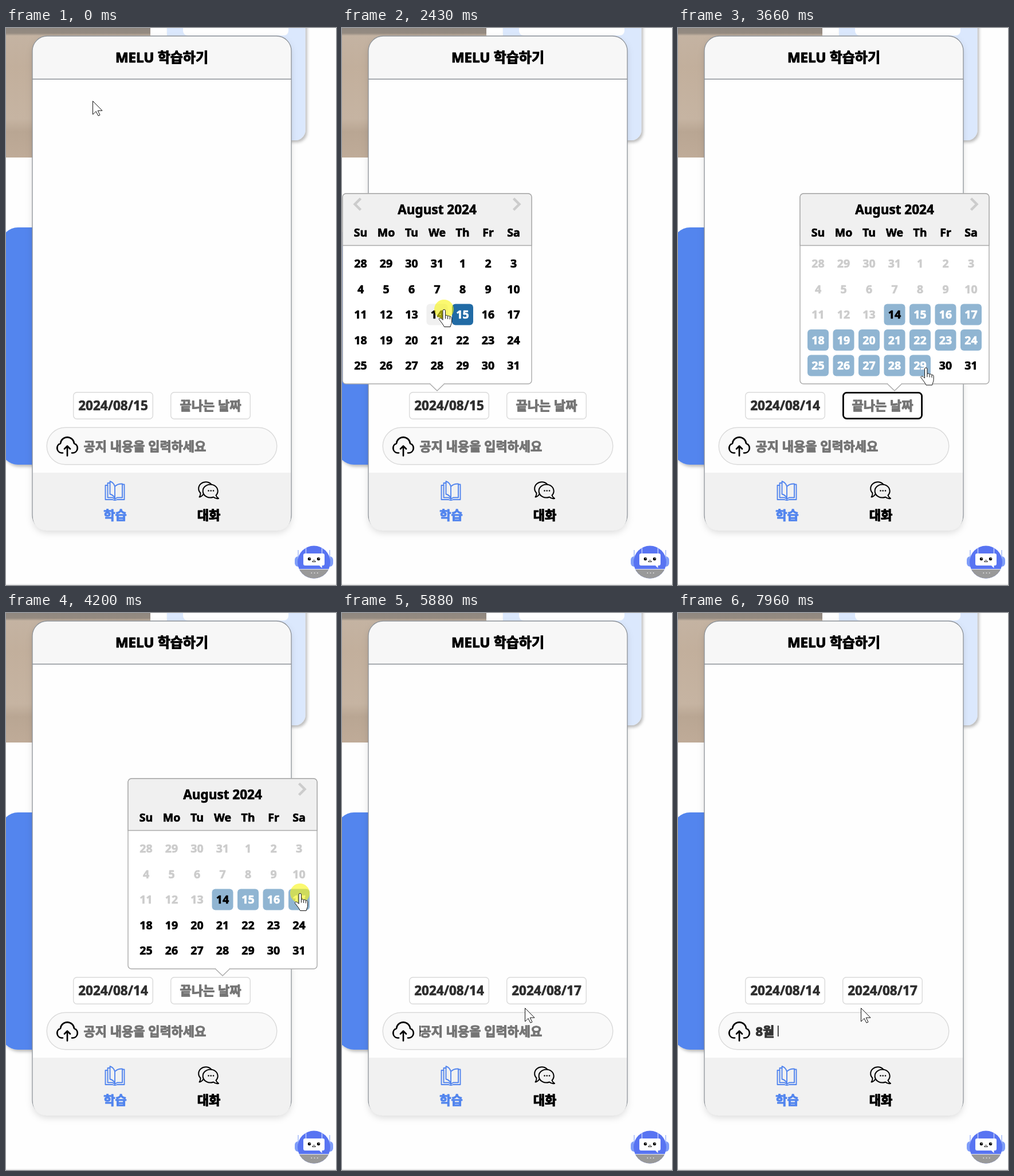
Animation, 576 px wide and 972 px high, one loop 8000 ms. Source, as an HTML page:

```html
<!DOCTYPE html>
<html lang="ko">
<head>
<meta charset="utf-8">
<title>학습하기</title>
<style>
html, body { margin: 0; width: 100%; height: 100%; overflow: hidden; background: #fefefe; }
svg { display: block; width: 576px; height: 972px; }
text {
  font-family: 'Noto Sans', 'Noto Sans CJK KR', 'Noto Sans CJK', sans-serif;
  font-weight: 800; white-space: pre;
  fill: currentColor; stroke: currentColor; stroke-width: .7; stroke-linejoin: round;
}
.ko { font-weight: 900; stroke-width: 1.1; }
.mid { text-anchor: middle; }
.line { fill: none; stroke-linecap: round; stroke-linejoin: round; }
</style>
</head>
<body>
<svg viewBox="0 0 576 972">
  <defs>
    <linearGradient id="sand" x2="0" y2="1">
      <stop offset="0" stop-color="#8f877f"/>
      <stop offset=".04" stop-color="#958b81"/>
      <stop offset=".06" stop-color="#c4b3a2"/>
      <stop offset=".3" stop-color="#c2af9c"/>
      <stop offset=".7" stop-color="#c6b4a2"/>
      <stop offset=".8" stop-color="#b9a693"/>
      <stop offset="1" stop-color="#bfab98"/>
    </linearGradient>
    <filter id="cardShade" x="-10%" y="-10%" width="130%" height="130%">
      <feDropShadow dx="3" dy="3.5" stdDeviation="2.5" flood-opacity=".26"/>
    </filter>
    <filter id="panelShade" x="-10%" y="-10%" width="120%" height="120%">
      <feDropShadow dx="0" dy="5" stdDeviation="6" flood-opacity=".13"/>
    </filter>
    <clipPath id="head"><circle cx="537.5" cy="932" r="28.5"/></clipPath>
  </defs>

  <!-- page behind the panel -->
  <rect width="576" height="972" fill="#fefefe"/>
  <rect width="252" height="226" fill="url(#sand)"/>
  <rect x="-9" y="348" width="300" height="414" rx="30" fill="#5285ee" filter="url(#cardShade)"/>
  <rect x="281" y="-60" width="241.5" height="256" rx="18" fill="#dbe8fd" filter="url(#cardShade)"/>
  <rect x="309" y="-40" width="184" height="53" rx="8" fill="#fefefe"/>
  <path d="M0 971H576" stroke="#dedede"/>

  <!-- panel -->
  <rect x="46" y="14" width="452" height="862" rx="26" fill="#fefefe" filter="url(#panelShade)"/>
  <path d="M46 89V40a26 26 0 0 1 26-26H472a26 26 0 0 1 26 26V89Z" fill="#f7f7f7"/>
  <rect x="46" y="14" width="452" height="862" rx="26" fill="none" stroke="#8d9298" stroke-width="1.3"/>
  <path d="M46 89.2H498" stroke="#8d9298" stroke-width="1.6"/>
  <path d="M47 776H497V854a23 23 0 0 1-23 23H70a23 23 0 0 1-23-23Z" fill="#f1f1f1"/>
  <text class="ko mid" x="272" y="60" font-size="24">MELU 학습하기</text>

  <g stroke="#dadada" stroke-width="1.4">
    <rect id="box1" x="117.7" y="635.7" width="138.6" height="46.6" rx="6" fill="#fff"/>
    <rect id="box2" x="287.7" y="635.7" width="138.6" height="46.6" rx="6" fill="#fff"/>
    <rect x="71.2" y="697.2" width="401.6" height="64.6" rx="32.3" fill="#f9f9f9"/>
  </g>
  <text id="date1" class="mid" x="187" y="667" font-size="22.5" color="#2e2e2e"></text>
  <text id="date2" class="mid" x="357" y="667" font-size="22"></text>
  <text id="note" class="ko" x="135.5" y="738" font-size="22"></text>

  <g class="line" stroke="#000" stroke-width="2.7">
    <path d="M99 741.5H97A8.5 8.5 0 0 1 95 725A12.05 12.05 0 0 1 119 725A8.5 8.5 0 0 1 117 741.5H115"/>
    <path d="M107 746.5V730M102 734.5L107 729.5L112 734.5"/>
  </g>

  <!-- tabs -->
  <g class="line" stroke="#5285ee" stroke-width="1.9">
    <path d="M177 798H173.5V823H186Q190 825 194 823H206.500V796.500H203"/>
    <path d="M181.500 794H177.500V819.500H186L190 822L194 819.500H203V795.500Q195 795 190 800V822"/>
    <path d="M190 800Q188 793 181.500 791V813.500Q188 815 190 821"/>
  </g>
  <g class="line" stroke="#000" stroke-width="2">
    <path d="M344.500 813.500Q341.500 818 337.500 818.500Q340 815 339.500 811.500A11.500 10.500 0 1 1 358 796"/>
    <path d="M366.500 815.500Q368 819.500 371 821Q366 822 362 818.500A13 11.500 0 1 1 366.500 815.500Z" fill="#f1f1f1"/>
  </g>
  <g><circle cx="353.500" cy="807.500" r="1.300"/><circle cx="357.700" cy="807.500" r="1.300"/><circle cx="362" cy="807.500" r="1.300"/></g>
  <text class="ko mid" x="190.500" y="858" font-size="22" color="#5285ee">학습</text>
  <text class="ko mid" x="354" y="858" font-size="22">대화</text>

  <!-- helper bot -->
  <g fill="#7f9df8">
    <rect x="504" y="922" width="12" height="18" rx="6"/>
    <rect x="559" y="922" width="12" height="18" rx="6"/>
    <path d="M510 911V926M565 911V926" stroke="#a9bdfb" stroke-width="1.600"/>
  </g>
  <g clip-path="url(#head)">
    <rect x="505" y="900" width="66" height="66" fill="#5874f2"/>
    <rect x="505" y="945" width="66" height="20" fill="#999"/>
    <path d="M505 944.500H571" stroke="#e6e9f5" stroke-width="1.200"/>
    <path d="M523.500 903V918M551.500 903V918" stroke="#c9d4fd" stroke-width="1.400"/>
  </g>
  <path d="M522 917H553a3 3 0 0 1 3 3V935a3 3 0 0 1-3 3H551.500V942.500L547 938H522a3 3 0 0 1-3-3V920a3 3 0 0 1 3-3Z" fill="#fff"/>
  <circle cx="529.500" cy="926.500" r="2.700"/><circle cx="545.500" cy="926.500" r="2.700"/>
  <circle cx="530.300" cy="925.700" r=".8" fill="#fff"/><circle cx="546.300" cy="925.700" r=".8" fill="#fff"/>
  <path d="M534.500 931.500L537.500 928L540.500 931.500Z" fill="none" stroke="#222"/>
  <path d="M532.500 951H545" stroke="#eee" stroke-width="1.600" stroke-dasharray="1.600 3.600"/>

  <g id="cals"></g>
  <rect id="caret" width="1.4"/>
  <circle id="press" r="17" fill="#f8f610" opacity=".6"/>
  <g id="pointer">
    <path id="arrow" d="M.5 .5V24L6 18.500L10 26.200L13 24.800L9.200 17.200H17Z" fill="#fff" stroke="#111"/>
    <path id="beam" class="line" d="M-4 -11.500H-1.500L0 -10.500L1.500 -11.500H4M0 -10.500V10.500M-4 11.500H-1.500L0 10.500L1.500 11.500H4" stroke="#222" stroke-width="1.300"/>
    <g id="hand" stroke="#111">
      <path d="M-2 2.500a2.200 2.200 0 0 1 4.400 0V11c1-1 4-1 4.200 .8c1-.8 3.600-.6 3.800 1.200c1-.6 3.200-.2 3.200 1.800V21c0 4-2 6-2.500 9.500H.5C-1 27-5 22-8.500 17.500c-1-2 2-3.400 4-1.600l2.500 2.600Z" fill="#fff"/>
      <path d="M2.400 11V16.500M6.600 12V17M10.400 13V17.500" fill="none"/>
    </g>
  </g>
</svg>
<script>
const LOOP = 8000, COL = 44.5, CELL = 37;
const $ = id => document.getElementById(id);

// start, end, x, y of each pointer move
const moves = [
  [0, 0, 151, 127], [680, 1330, 195.5, 658], [1600, 2400, 178, 491],
  [2490, 3050, 374, 668], [3330, 4070, 513, 489], [4270, 4670, 264, 737],
  [5010, 5140, 319, 689]
];
const presses = [[1470, 1540], [2430, 2500], [3110, 3170], [4200, 4270], [4810, 4880]];
const focus1 = [[1470, 2430], [2500, 3110]];
const focus2 = [[3110, 4200], [4270, 4810]];
const pageCaret = [[70, 590], [1110, 1470]];
const noteCaret = [[4810, 5350], [5880, 6420], [6550, LOOP]];
const typed = [
  [0, ''], [6550, '8'], [6690, '8d'], [6950, '8dn'], [7140, '8d'], [7280, '8'],
  [7490, '8ㅇ'], [7550, '8우'], [7690, '8워'], [7760, '8월'], [7960, '8월\u00a0']
];

const during = (spans, t) => spans.some(([a, b]) => t >= a && t < b);
const within = (p, x, y, w, h) => p.x >= x && p.x <= x + w && p.y >= y && p.y <= y + h;
const show = (node, on) => node.setAttribute('visibility', on ? 'visible' : 'hidden');
const ease = k => k * k * (3 - 2 * k);

function set(node, attrs) {
  for (const key in attrs) node.setAttribute(key, attrs[key]);
  return node;
}
function add(parent, tag, attrs, text) {
  const node = set(document.createElementNS('http://www.w3.org/2000/svg', tag), attrs);
  if (text !== undefined) node.textContent = text;
  return parent.appendChild(node);
}

function calendar(left, hasPrev) {
  const g = add($('cals'), 'g', { transform: `translate(${left} 0)` });
  const edge = { stroke: '#aaa', 'stroke-width': 1.4 };
  const label = (x, y, size, s) => add(g, 'text', { class: 'mid', x, y: y + size * .36, 'font-size': size }, s);
  const chevron = d => add(g, 'path', { d, fill: 'none', stroke: '#ccc', 'stroke-width': 4.4 });
  add(g, 'rect', { x: 1, y: 289, width: 330, height: 332, rx: 6, fill: '#fff', ...edge });
  add(g, 'path', { d: 'M1 379.500V295a6 6 0 0 1 6-6H325a6 6 0 0 1 6 6V379.500Z', fill: '#f0f0f0', ...edge });
  add(g, 'path', { d: 'M153.500 621L166 633L178.500 621', fill: '#fff', ...edge });
  add(g, 'path', { d: 'M154.500 620.500H177.500', stroke: '#fff', 'stroke-width': 1.6 });
  if (hasPrev) chevron('M32.500 297.500L22.500 307.500L32.500 317.500');
  chevron('M299.500 297.500L309.500 307.500L299.500 317.500');
  label(166, 317, 22.5, 'August 2024');
  const days = [];
  ['Su', 'Mo', 'Tu', 'We', 'Th', 'Fr', 'Sa'].forEach((s, i) => label(32.5 + i * COL, 356.5, 19.5, s));
  for (let i = 0; i < 35; i++) {
    const x = 32.5 + i % 7 * COL, y = 411 + Math.floor(i / 7) * COL;
    const cell = add(g, 'rect', { x: x - CELL / 2, y: y - CELL / 2, width: CELL, height: CELL, rx: 6 });
    const num = i < 4 ? 28 + i : i - 3;
    days.push({ cell, text: label(x, y, 19.5, num) });
  }
  return { g, days, left };
}
const cal1 = calendar(0, true), cal2 = calendar(212, false);
const FIRST = 17, CHOSEN = 18;

// day index under the point, or -1; loose also accepts the gaps
function dayAt(p, left, loose) {
  const fx = (p.x - left - 32.5) / COL, fy = (p.y - 411) / COL;
  const c = Math.round(fx), r = Math.round(fy);
  if (c < 0 || c > 6 || r < 0 || r > 4) return -1;
  const reach = CELL / 2 / COL;
  if (!loose && (Math.abs(fx - c) > reach || Math.abs(fy - r) > reach)) return -1;
  return r * 7 + c;
}

function pointerAt(t) {
  let p = { x: moves[0][2], y: moves[0][3] };
  for (const [a, b, x, y] of moves.slice(1)) {
    if (t < a) break;
    const k = ease(Math.min(1, (t - a) / (b - a)));
    p = { x: p.x + (x - p.x) * k, y: p.y + (y - p.y) * k };
  }
  return p;
}

function paint(day, back, ink) {
  day.cell.setAttribute('fill', back);
  day.text.setAttribute('color', ink);
}

function border(box, x, on) {
  const w = on ? 2.8 : 1.4;
  set(box, {
    x: x + w / 2, y: 635 + w / 2, width: 140 - w, height: 48 - w,
    stroke: on ? '#000' : '#dadada', 'stroke-width': w
  });
}

function placeCaret(t, end) {
  let spot = null;
  if (during(pageCaret, t)) spot = [60.3, 98, 22];
  else if (t >= 3110 && t < 3640) spot = [360, 650, 19];
  else if (during(noteCaret, t)) spot = [end, 720, 19];
  show($('caret'), spot);
  if (spot) set($('caret'), { x: spot[0], y: spot[1], height: spot[2] });
}

function render(t) {
  const p = pointerAt(t);
  const open1 = t >= 1470 && t < 2500, open2 = t >= 3110 && t < 4270;
  const hit1 = open1 ? dayAt(p, cal1.left) : -1;
  const hit2 = open2 ? dayAt(p, cal2.left) : -1;
  const last = open2 ? dayAt(p, cal2.left, true) : -1;

  show(cal1.g, open1);
  show(cal2.g, open2);
  cal1.days.forEach((d, i) => {
    if (i === CHOSEN) paint(d, '#216ba5', '#fff');
    else paint(d, i === hit1 ? '#f0f0f0' : 'none', '#000');
  });
  cal2.days.forEach((d, i) => {
    if (i < FIRST) paint(d, 'none', '#ccc');
    else if (i === FIRST) paint(d, '#90b5d2', '#000');
    else if (i <= last) paint(d, '#90b5d2', '#fff');
    else paint(d, 'none', '#000');
  });

  border($('box1'), 117, during(focus1, t));
  border($('box2'), 287, during(focus2, t));
  $('date1').textContent = t < 2500 ? '2024/08/15' : '2024/08/14';
  const done = t >= 4270;
  $('date2').textContent = done ? '2024/08/17' : '끝나는 날짜';
  set($('date2'), {
    color: done ? '#2e2e2e' : '#757575',
    class: done ? 'mid' : 'mid ko',
    'font-size': done ? 22.5 : 22
  });

  const words = typed.filter(s => s[0] <= t).pop()[1];
  const note = $('note');
  note.textContent = words || '공지 내용을 입력하세요';
  note.setAttribute('color', words ? '#333' : '#757575');
  placeCaret(t, words ? 135.5 + note.getComputedTextLength() : 135.5);

  const hand = hit1 >= 0 || hit2 >= FIRST;
  const beam = !hand && (within(p, 117, 635, 140, 48) || within(p, 287, 635, 140, 48) || within(p, 130, 697, 330, 65));
  show($('hand'), hand);
  show($('beam'), beam);
  show($('arrow'), !hand && !beam);
  $('pointer').setAttribute('transform', `translate(${p.x} ${p.y})`);
  set($('press'), { cx: p.x - (beam ? 1 : 0), cy: p.y });
  show($('press'), during(presses, t));
}

const start = performance.now();
function tick() {
  render((performance.now() - start) % LOOP);
  requestAnimationFrame(tick);
}
tick();
</script>
</body>
</html>
```
